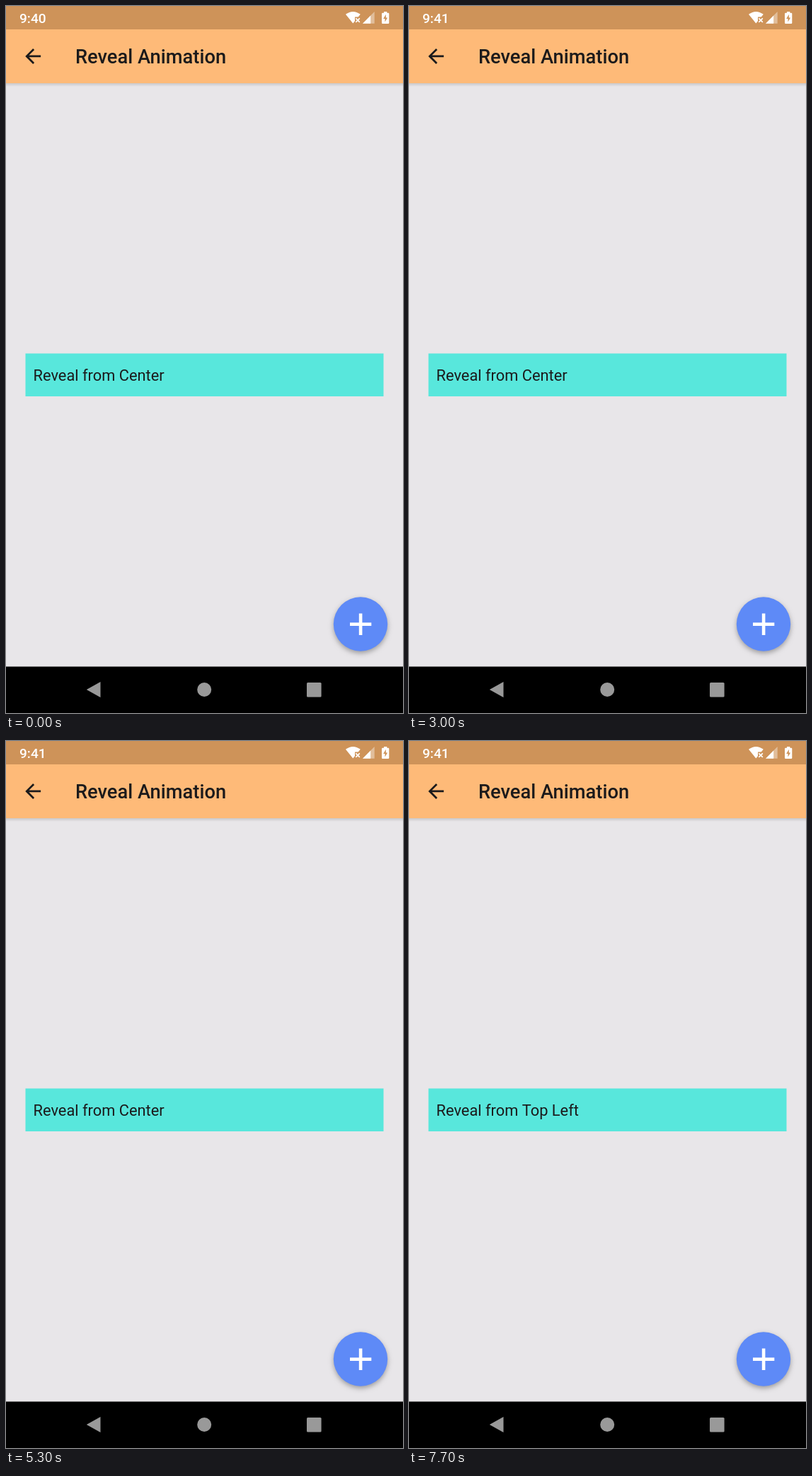
An HTML page with a canvas for the animation above (8 s loop, 561 by 998 pixels).

```html
<!DOCTYPE html>
<html lang="en">
<head>
<meta charset="utf-8">
<title>Reveal Animation</title>
<style>
  html, body { margin: 0; width: 100%; height: 100%; overflow: hidden; background: #000; }
  canvas { display: block; width: 561px; height: 998px; }
</style>
</head>
<body>
<canvas id="stage" width="561" height="998"></canvas>
<script>
const ctx = document.getElementById('stage').getContext('2d');
const W = 561, TOP = 109, BOTTOM = 932.5;
const LOOP = 8000, STEP = 100;
const DP = 1.365;
const INK = '#1b1a1b';
const CENTER = { x: 280.5, y: 521 };
const FULL_RADIUS = 505;
const OPTIONS = ['Center', 'Top Left', 'Top Right', 'Bottom Right', 'Bottom Left'];

// When the pink layer starts to grow, is complete, and is removed
const REVEALS = [
  { start: 1420, full: 1900, end: 3000 },
  { start: 3910, full: 4130, end: 5300 }
];
const MENU = { start: 6220, open: 6400, leave: 7120, end: 7400 };

const clamp = v => Math.min(1, Math.max(0, v));
const span = (t, a, b) => clamp((t - a) / (b - a));
const ease = p => (1 - Math.cos(Math.PI * p)) / 2;

function rect(x, y, w, h, color) {
  ctx.fillStyle = color;
  ctx.fillRect(x, y, w, h);
}

function round(x, y, w, h, r, color) {
  ctx.fillStyle = color;
  ctx.beginPath();
  ctx.roundRect(x, y, w, h, r);
  ctx.fill();
}

function disc(x, y, r, color) {
  ctx.fillStyle = color;
  ctx.beginPath();
  ctx.arc(x, y, r, 0, 2 * Math.PI);
  ctx.fill();
}

function poly(points, color) {
  ctx.fillStyle = color;
  ctx.beginPath();
  points.forEach(([x, y]) => ctx.lineTo(x, y));
  ctx.closePath();
  ctx.fill();
}

function text(str, x, y, size, color, weight = 400, align = 'left') {
  ctx.font = `${weight} ${size}px Roboto, sans-serif`;
  ctx.textAlign = align;
  ctx.fillStyle = color;
  ctx.fillText(str, x, y);
}

function shadow(color, blur, dy) {
  ctx.shadowColor = color;
  ctx.shadowBlur = blur;
  ctx.shadowOffsetY = dy;
}

function noShadow() {
  shadow('transparent', 0, 0);
}

function wifi(bar) {
  ctx.fillStyle = '#fff';
  ctx.beginPath();
  ctx.moveTo(490.3, 24.5);
  ctx.lineTo(480, 11.8);
  ctx.quadraticCurveTo(490.3, 4.2, 500.8, 11.8);
  ctx.closePath();
  ctx.fill();
  rect(493, 15.5, 9, 9.5, bar);
  ctx.strokeStyle = '#fff';
  ctx.lineWidth = 1.7;
  ctx.beginPath();
  ctx.moveTo(494.3, 17.3);
  ctx.lineTo(499.8, 22.8);
  ctx.moveTo(499.8, 17.3);
  ctx.lineTo(494.3, 22.8);
  ctx.stroke();
}

function statusBar(t) {
  const bar = '#ce9359';
  rect(0, 0, W, 33, bar);
  text(t < 700 ? '9:40' : '9:41', 19, 24, 14 * DP, '#fff', 500);
  wifi(bar);
  poly([[504, 24.7], [520.7, 8], [520.7, 24.7]], 'rgba(255,255,255,.4)');
  poly([[504, 24.7], [515.2, 13.5], [515.2, 24.7]], '#fff');
  round(531, 9.7, 10.3, 15.2, 1.2, '#fff');
  rect(534, 8, 4.3, 2.5, '#fff');
  poly([[536.8, 11.8], [533.2, 18], [535.5, 18], [535.5, 22.6], [539.1, 16.4], [536.8, 16.4]], bar);
}

const arrow = new Path2D('M20 11H7.83l5.59-5.59L12 4l-8 8 8 8 1.41-1.41L7.83 13H20z');

function toolbar() {
  rect(0, 33, W, TOP - 33, '#feba78');
  ctx.save();
  ctx.translate(21.8, 54.6);
  ctx.scale(DP, DP);
  ctx.fillStyle = INK;
  ctx.fill(arrow);
  ctx.restore();
  text('Reveal Animation', 98, 81, 20 * DP, INK, 500);
}

function toolbarShadow() {
  const g = ctx.createLinearGradient(0, TOP, 0, TOP + 5);
  g.addColorStop(0, 'rgba(0,0,0,.13)');
  g.addColorStop(1, 'rgba(0,0,0,0)');
  rect(0, TOP, W, 5, g);
}

function picker(t) {
  const picked = t < 7200 ? 0 : 1;
  rect(27.5, 490.5, 506, 60.5, '#58e7dc');
  text('Reveal from ' + OPTIONS[picked], 38.5, 529, 16 * DP, INK);
}

function pinkLayer(t) {
  const r = REVEALS.find(v => t >= v.start && t < v.end);
  if (!r) return;
  ctx.save();
  ctx.beginPath();
  ctx.arc(CENTER.x, CENTER.y, FULL_RADIUS * ease(span(t, r.start, r.full)), 0, 2 * Math.PI);
  ctx.clip();
  rect(0, TOP, 560.3, 823, '#e043a4');
  text('Lumetira Rocks!', 280, 542, 40 * DP, '#fff', 400, 'center');
  ctx.restore();
}

function addButton() {
  shadow('rgba(0,0,0,.32)', 7, 3);
  disc(501, 872.5, 38.2, '#5e8af7');
  noShadow();
  rect(486, 870.4, 30.3, 4.6, '#fff');
  rect(498.8, 857.5, 4.6, 30.5, '#fff');
}

function menu(t) {
  if (t < MENU.start || t >= MENU.end) return;
  const open = ease(span(t, MENU.start, MENU.open));
  const h = 328;
  ctx.save();
  ctx.globalAlpha = open * (1 - span(t, MENU.leave, MENU.end));
  const shown = 60 + (h - 60) * open;
  ctx.beginPath();
  ctx.rect(0, 470, W, shown + 20 + 45 * open);
  ctx.clip();
  shadow('rgba(0,0,0,.32)', 26, 10);
  round(27.5, 490.5, 440.5, h, 2.7, '#faf8fb');
  noShadow();
  OPTIONS.forEach((name, i) =>
    text('Reveal from ' + name, 38.5, 532 + i * 65.55, 16 * DP, INK));
  ctx.restore();
}

function navBar() {
  const gray = '#999';
  rect(0, BOTTOM, W, 998 - BOTTOM, '#000');
  poly([[113.8, 965], [133.5, 954], [133.5, 976]], gray);
  disc(280.2, 965, 10, gray);
  round(425, 955, 20.6, 20.6, 1.5, gray);
}

function draw(t) {
  rect(0, 0, W, 998, '#e8e6e9');
  picker(t);
  pinkLayer(t);
  toolbarShadow();
  addButton();
  menu(t);
  statusBar(t);
  toolbar();
  navBar();
}

const begin = performance.now();

function tick() {
  const t = (performance.now() - begin) % LOOP;
  draw(Math.floor(t / STEP) * STEP);
  requestAnimationFrame(tick);
}

tick();
</script>
</body>
</html>
```
